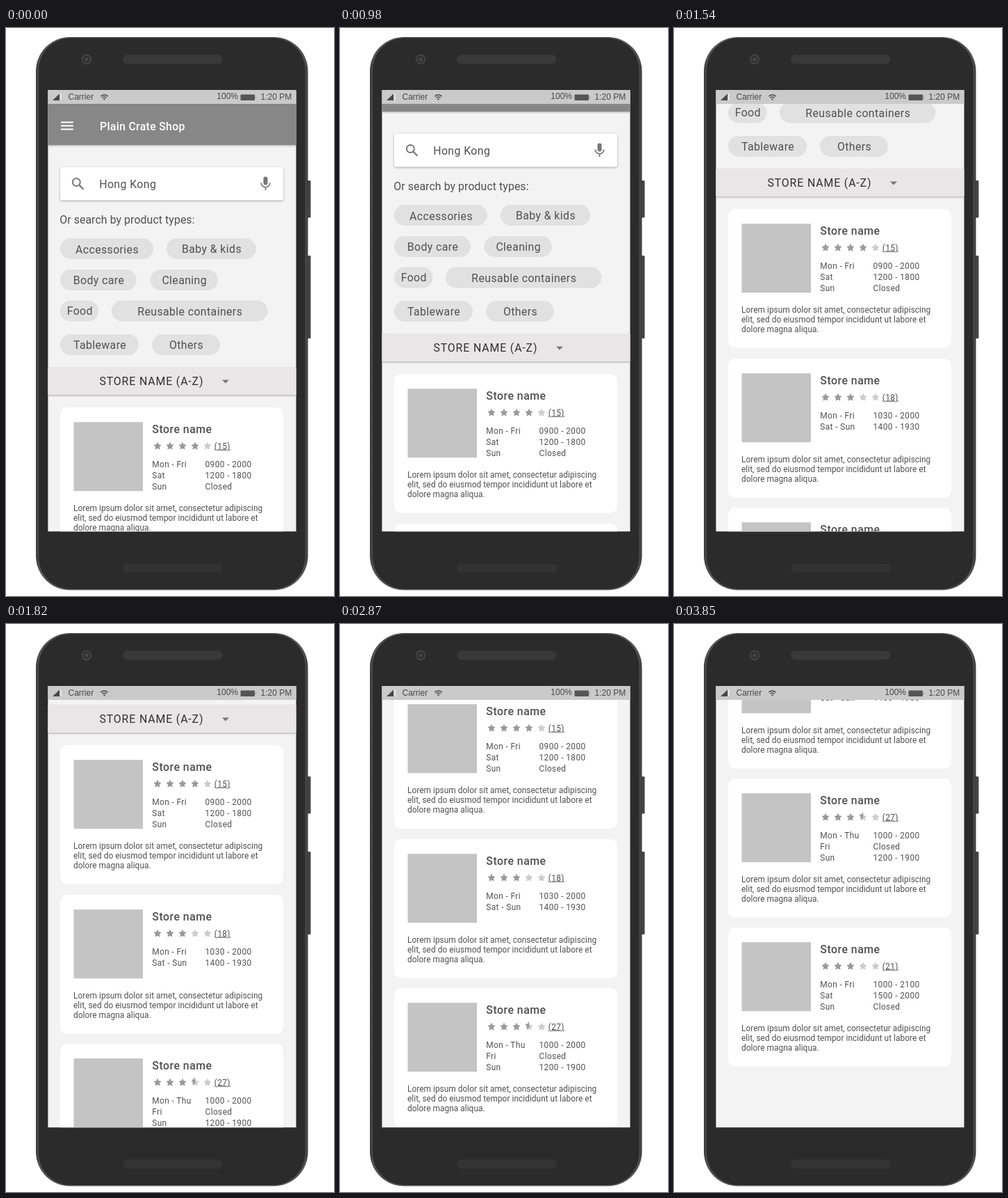
An HTML page for the animation above (3.92 s loop, 472 by 816 pixels).

```html
<!DOCTYPE html>
<html lang="en">
<head>
<meta charset="utf-8">
<title>Store finder</title>
<style>
  html, body { margin: 0; width: 100%; height: 100%; overflow: hidden; background: #fff; }
  svg { display: block; font-family: Roboto, sans-serif; fill: #505050; }
  .body { font-size: 15.87px; letter-spacing: .4px; }
  .chip { text-anchor: middle; }
  .head { font-size: 15.87px; font-weight: 500; letter-spacing: .5px; }
  .small { font-size: 11.9px; letter-spacing: .4px; }
  .lorem { font-size: 11.9px; letter-spacing: .03px; }
  .status { font: 12px "Liberation Sans", Arial, sans-serif; fill: #484848; }
  .raised { filter: drop-shadow(0 1.5px 1.5px rgba(0, 0, 0, .32)); }
</style>
</head>
<body>
<svg width="472" height="816" viewBox="0 0 472 816">
  <defs>
    <clipPath id="screen"><rect x="60.4" y="89" width="357.1" height="634.3"/></clipPath>
    <clipPath id="half"><rect x="-7" y="-8" width="7" height="16"/></clipPath>
    <linearGradient id="rim">
      <stop offset="0" stop-color="#3a3a3a"/><stop offset=".012" stop-color="#505050"/>
      <stop offset=".988" stop-color="#505050"/><stop offset="1" stop-color="#3a3a3a"/>
    </linearGradient>
  </defs>

  <g fill="#454545">
    <rect x="430" y="219" width="8.5" height="53.5" rx="1.5"/>
    <rect x="430" y="327" width="8.5" height="119" rx="1.5"/>
  </g>
  <rect x="43" y="13" width="391.5" height="794.5" rx="49" fill="url(#rim)"/>
  <rect x="47" y="14.5" width="383.5" height="791.5" rx="46" fill="#2b2b2b"/>
  <g fill="#393939">
    <rect x="168" y="38.5" width="143.5" height="13" rx="6.5"/>
    <rect x="168" y="769.5" width="143.5" height="13" rx="6.5" fill="#333"/>
    <circle cx="116" cy="45" r="7.5" fill="#414141"/>
    <circle cx="116" cy="45" r="5" fill="#303030"/>
    <circle cx="116" cy="45" r="2.5" fill="#484848"/>
  </g>

  <g clip-path="url(#screen)">
    <rect x="60" y="89" width="358" height="635" fill="#f3f3f3"/>
    <g id="page">
      <rect class="raised" x="60" y="100" width="358" height="68" fill="#878787"/>
      <path d="M79 134.5h18v2H79zm0 5h18v2H79zm0 5h18v2H79z" fill="#fff"/>
      <text class="head" x="135" y="147" style="letter-spacing:.3px" fill="#fff">Plain Crate Shop</text>

      <rect class="raised" x="78" y="200" width="321" height="47.5" rx="2" fill="#fff"/>
      <g fill="none" stroke="#777" stroke-width="2">
        <circle cx="101.3" cy="221.5" r="5.5"/>
        <path d="M105.3 225.5l6.2 6.2" stroke-width="2.3"/>
        <path d="M367.2 222.5a6.2 6.2 0 0 0 12.6 0M373.5 229v4" stroke-width="1.8"/>
      </g>
      <rect x="370.5" y="213.5" width="6" height="12" rx="3" fill="#777"/>
      <text class="body" x="134.2" y="230">Hong Kong</text>
      <text class="body" x="77.2" y="281" style="letter-spacing:.08px">Or search by product types:</text>
      <g id="chips"></g>

      <rect class="raised" x="60" y="488" width="358" height="39" fill="#e9e6e7"/>
      <text class="body" x="134.4" y="513" style="letter-spacing:.87px" fill="#303030">STORE NAME (A-Z)</text>
      <path d="M311 505.5h10l-5 5z" fill="#777"/>
      <g id="cards"></g>
    </g>

    <rect x="60" y="89" width="358" height="20" fill="#cacaca"/>
    <path d="M67 104h10V94.5z" fill="#484848"/>
    <path d="M78 94h2v10h-2z" fill="#e4e4e4"/>
    <path d="M136.2 98.2q5.3-4.6 10.6 0M138.2 100.3q3.3-2.7 6.6 0" fill="none" stroke="#484848" stroke-width="1.4"/>
    <path d="M139.7 101.8q1.8-1.2 3.6 0l-1.8 2z" fill="#484848"/>
    <text class="status" x="89.5" y="103">Carrier</text>
    <text class="status" x="303.3" y="102">100%</text>
    <rect x="337.5" y="95.5" width="20.5" height="8.5" rx="1" fill="#555"/>
    <path d="M359 98q1.8 1.7 0 3.5z" fill="#555"/>
    <text class="status" x="366.5" y="103">1:20 PM</text>
  </g>
</svg>
<script>
const LOOP = 3920, STEP = 70, DISTANCE = 376;
const byId = id => document.getElementById(id);

// Label, left, top, width, baseline
const chips = [
  ['Accessories', 78, 302, 134, 323.5], ['Baby &amp; kids', 231, 302, 129, 322.5],
  ['Body care', 78, 347, 110, 368], ['Cleaning', 207.5, 347, 97.5, 368],
  ['Food', 78, 391.5, 55.5, 411.5], ['Reusable containers', 152, 391.5, 224.5, 412.5],
  ['Tableware', 78, 440, 113, 461], ['Others', 210, 440, 98, 461]
];
byId('chips').innerHTML = chips.map(([label, x, y, w, base]) =>
  `<rect x="${x}" y="${y}" width="${w}" height="30" rx="15" fill="#e1e1e1"/>
   <text class="body chip" x="${x + w / 2 + .5}" y="${base}">${label}</text>`).join('');

const stores = [
  [4, 15, 'Mon - Fri|0900 - 2000', 'Sat|1200 - 1800', 'Sun|Closed'],
  [3, 18, 'Mon - Fri|1030 - 2000', 'Sat - Sun|1400 - 1930'],
  [3.5, 27, 'Mon - Thu|1000 - 2000', 'Fri|Closed', 'Sun|1200 - 1900'],
  [3, 21, 'Mon - Fri|1000 - 2100', 'Sat|1500 - 2000', 'Sun|Closed']
];
const lorem = [
  'Lorem ipsum dolor sit amet, consectetur adipiscing',
  'elit, sed do eiusmod tempor incididunt ut labore et',
  'dolore magna aliqua.'
];

const starPoints = Array.from({ length: 10 }, (_, i) => {
  const r = i % 2 ? 2.5 : 5.2, a = i * Math.PI / 5;
  return `${(r * Math.sin(a)).toFixed(2)},${(-r * Math.cos(a)).toFixed(2)}`;
}).join(' ');
const star = (color, extra = '') =>
  `<polygon points="${starPoints}" fill="${color}" stroke="${color}" stroke-linejoin="round" ${extra}/>`;
const text = (cls, x, y, s, extra = '') => `<text class="${cls}" x="${x}" y="${y}" ${extra}>${s}</text>`;

function card([rating, count, ...hours], i) {
  let s = `<rect x="78" width="321" height="199.7" rx="10" fill="#fff"/>
    <rect x="97.5" y="21.2" width="99.5" height="99" fill="#c4c4c4"/>`;
  s += text('head', 210.3, 36.5, 'Store name');
  for (let n = 0; n < 5; n++) {
    const half = rating - n === .5;
    s += `<g transform="translate(${218 + 18 * n} 55.8)">` + star(rating - n >= 1 ? '#999' : '#ccc') +
      (half ? `<g transform="translate(0 -2)">${star('#999', 'clip-path="url(#half)"')}</g>` : '') + '</g>';
  }
  s += text('small', 299.7, 59.5, `(${count})`, 'text-decoration="underline"');
  hours.forEach((row, n) => {
    const [day, time] = row.split('|');
    s += text('small', 210.2, 86 + 16 * n, day) + text('small', 286.5, 86 + 16 * n, time);
  });
  lorem.forEach((line, n) => s += text('lorem', 97, 148.5 + 14 * n, line));
  return `<g transform="translate(0 ${Math.round(545.3 + 214.3 * i)})">${s}</g>`;
}
byId('cards').innerHTML = stores.map(card).join('');

// Speed ramps up from a slow start, holds, then ramps down the same way
function ease(x) {
  const ramp = .263, slow = .27, speed = 1 / (1 - ramp + slow * ramp);
  if (x > .5) return 1 - ease(1 - x);
  if (x > ramp) return .5 + speed * (x - .5);
  return speed * (slow * x + (1 - slow) * x * x / (2 * ramp));
}
const glide = (t, start) => ease(Math.min(1, Math.max(0, (t - start) / 1088)));

const page = byId('page'), began = performance.now();
function draw() {
  const now = Math.max(0, performance.now() - began) % LOOP;
  const t = Math.floor(now / STEP) * STEP;
  const scroll = Math.round(DISTANCE * (glide(t, 770) + glide(t, 2590)));
  page.setAttribute('transform', `translate(0 ${-scroll})`);
  requestAnimationFrame(draw);
}
draw();
</script>
</body>
</html>
```
